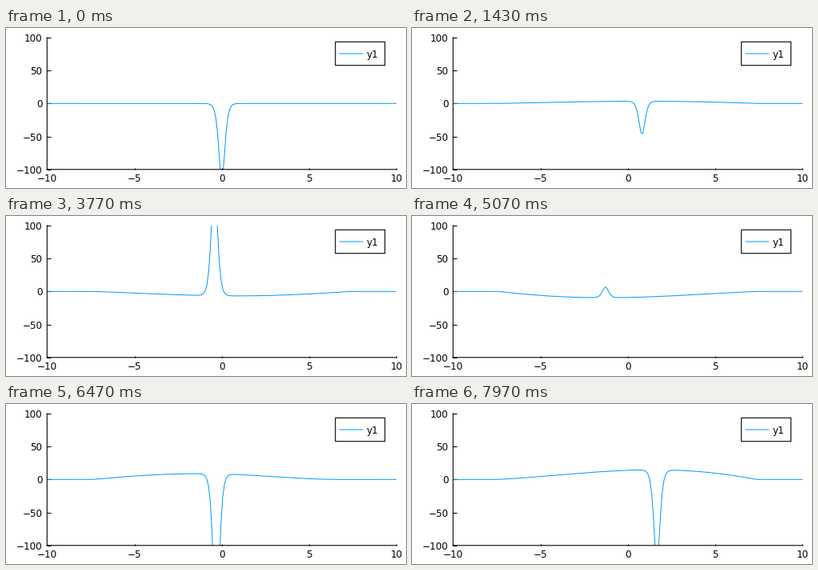
Write a matplotlib script that moves like this. It is 500 by 200 pixels and loops after 8 s.

```python
import numpy as np
import matplotlib.pyplot as plt
from matplotlib.animation import FuncAnimation
from matplotlib.lines import Line2D
from matplotlib.patches import Rectangle

W, H, DPI = 500, 200, 100
FPS, FRAMES = 30, 240
PX = 72 / DPI
BLUE = "#009afa"

LEFT, RIGHT, TOP, BOTTOM = 51.3, 488.2, 11.8, 176.8

plt.rcParams["font.family"] = "DejaVu Sans"
plt.rcParams["font.size"] = 12 * PX

# Pulse: a growing oscillation, its height follows its speed
AMP, GROWTH, OMEGA = 0.713, 0.1155, 0.939
GAIN, WIDTH = 174, 0.23

# Radiated field: a swelling dome that tilts at twice its own rate
REACH, SPEED, RATE = 7.4, 30, 1.04

x = np.linspace(-10, 10, 200)
dome = np.clip(1 - (x / REACH) ** 2, 0, None) ** 1.1


def field(t):
    late = np.maximum(t - np.abs(x) / SPEED, 0)
    swell = (1.2 + 1.65 * late) * np.tanh(2.2 * np.sin(RATE * late))
    tilt = 0.13 * t * np.cos(2 * RATE * t - 3.7)
    return dome * (swell + tilt * x)


def pulse(t):
    size = AMP * np.exp(GROWTH * t)
    s, c = np.sin(OMEGA * t), np.cos(OMEGA * t)
    pos = size * s
    vel = size * (GROWTH * s + OMEGA * c)
    return -GAIN * vel / np.cosh((x - pos) / WIDTH) ** 2


fig = plt.figure(figsize=(W / DPI, H / DPI), dpi=DPI, facecolor="white")
ax = fig.add_axes([LEFT / W, 1 - BOTTOM / H, (RIGHT - LEFT) / W, (BOTTOM - TOP) / H])
ax.set(xlim=(-10, 10), ylim=(-100, 100),
       xticks=range(-10, 11, 5), yticks=range(-100, 101, 50))
ax.spines[["top", "right"]].set_visible(False)
for side in ("left", "bottom"):
    ax.spines[side].set(linewidth=1.1 * PX, snap=False)
ax.tick_params(direction="in", width=1.1 * PX)
ax.tick_params(axis="x", length=2 * PX, pad=5 * PX)
ax.tick_params(axis="y", length=4.5 * PX, pad=6 * PX)

curve, = ax.plot([], [], color=BLUE, lw=PX)

# Legend, placed in pixels from the top left
page = fig.add_axes([0, 0, 1, 1])
page.set(xlim=(0, W), ylim=(H, 0))
page.axis("off")
page.add_patch(Rectangle((411.7, 17.3), 62, 29.4, fc="white", ec="black",
                         lw=1.1 * PX, snap=False))
page.add_line(Line2D([417, 446], [32, 32], color=BLUE, lw=PX, snap=False))
page.text(450.6, 32, "y1", ha="left", va="center_baseline")


def draw(frame):
    t = frame / FPS
    curve.set_data(x, field(t) + pulse(t))
    return curve,


anim = FuncAnimation(fig, draw, frames=FRAMES, interval=1000 / FPS,
                     repeat=True, repeat_delay=0, cache_frame_data=False)
plt.show()
```
